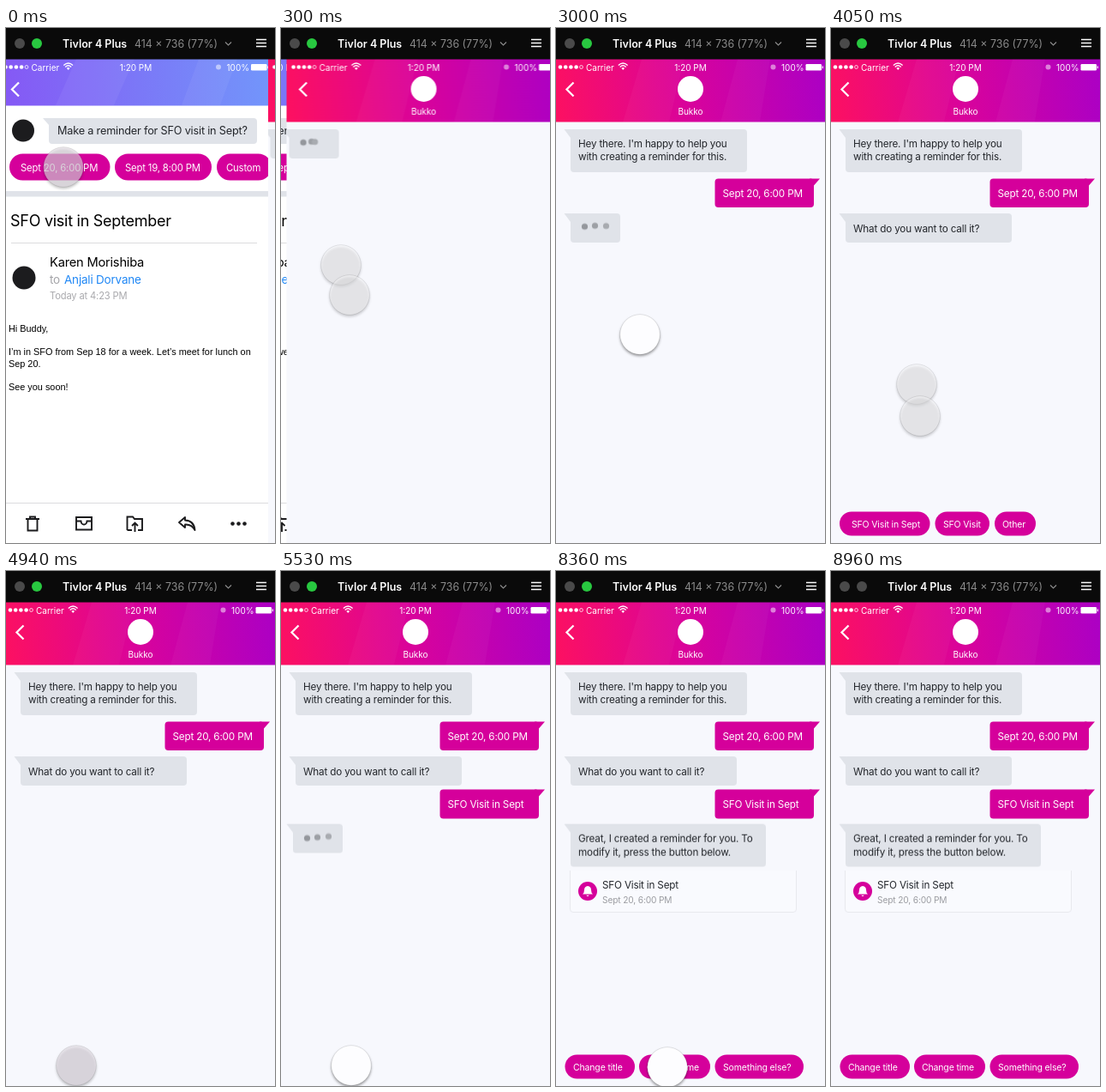
Animation of 314x600 px, one loop 9200 ms. Source, as an HTML page:

```html
<!DOCTYPE html>
<html lang="en">
<head>
<meta charset="utf-8">
<title>Reminder chat</title>
<style>
html, body { margin: 0; width: 100%; height: 100%; overflow: hidden; background: #fff; }
svg { display: block; width: 314px; height: 600px; }
text { font-family: Inter, Roboto, sans-serif; letter-spacing: -.015em; font-size: 11.7px; fill: #23262b; }
text.w { fill: #fff; }
text.s { font-size: 10px; letter-spacing: 0; }
text.pill { font-size: 10.5px; }
text.chip { font-size: 11.3px; }
text.mid { text-anchor: middle; }
text.mail { font: 10.88px "Liberation Sans", Arial, sans-serif; letter-spacing: 0; fill: #000; }
.line { fill: none; stroke: #1b1b1d; stroke-width: 1.9; }
.back { fill: none; stroke: #fff; stroke-width: 2.3; }
.pink { fill: #d5009b; }
.grey { fill: #e0e3e9; }

/* Page push: the old page moves at half speed */
.mailbox { animation: push-old 450ms linear both; }
.chat { animation: push-new 450ms linear both; }
@keyframes push-new {
  0% { transform: translateX(308.5px); } 33.333% { transform: translateX(80px); }
  66.667% { transform: translateX(9.5px); } 100% { transform: none; }
}
@keyframes push-old {
  0% { transform: none; } 33.333% { transform: translateX(-114px); }
  66.667% { transform: translateX(-149.5px); } 100% { transform: translateX(-154px); }
}

/* Replies: slide in with typing dots, then grow around the text */
@keyframes slide { from { transform: translateX(var(--from)); } to { transform: none; } }
@keyframes fade { from { opacity: 0; } to { opacity: 1; } }
@keyframes vanish { from { opacity: 1; } to { opacity: 0; } }
@keyframes grow {
  0% { width: 58px; height: 34px; }
  33.333% { width: calc(3.5px + var(--w) * .94); height: var(--h); }
  66.667% { width: calc(.6px + var(--w) * .99); height: var(--h); }
  100% { width: var(--w); height: var(--h); }
}
@keyframes bob { from { transform: none; } to { transform: translateY(-3px); } }
@keyframes gather { from { cx: var(--cx); } }
.reply { animation: slide var(--in) var(--t) ease-out both, fade 1ms calc(var(--t) - 1ms) both; }
.reply rect { animation: grow 450ms var(--open) linear both; }
.reply .words { animation: fade 130ms var(--open) linear both; }
.reply .dots { animation: vanish 130ms var(--open) linear both; }
.dots circle { fill: #94979c; animation: bob 450ms -845ms linear infinite alternate; }
.dots circle:nth-child(2) { fill: #9da0a5; animation-delay: -95ms; }
.dots circle:nth-child(3) { fill: #a8abb0; animation-delay: -245ms; }
.r1 { --in: 300ms; --t: 300ms; --open: 1050ms; --from: -17px; --w: 206px; --h: 50px; animation-name: slide, none; }
.r1 .dots circle:nth-child(2) { --cx: 26px; animation: bob 450ms -95ms linear infinite alternate, gather 150ms 300ms both; }
.r1 .dots circle:nth-child(3) { --cx: 30px; animation: bob 450ms -245ms linear infinite alternate, gather 150ms 300ms both; }
.r2 { --in: 150ms; --t: 2400ms; --open: 3150ms; --from: -1px; --w: 194px; --h: 34px; }
.r3 { --in: 150ms; --t: 5530ms; --open: 6130ms; --from: -3px; --w: 228px; --h: 50px; }

/* Answers from the right */
.sent { animation: send 450ms var(--t) linear both; }
@keyframes send {
  0% { transform: translateX(16px); opacity: 0; } 33.333% { transform: translateX(7px); opacity: .6; }
  66.667% { transform: translateX(1.5px); opacity: .93; } 100% { transform: none; opacity: 1; }
}

.choices { animation: fade 300ms 3300ms linear both, vanish 150ms 4780ms linear forwards; }
.edits { --from: -8px; animation: fade 440ms 6420ms linear both, slide 440ms 6420ms linear both; }
.card { animation: card 440ms 6420ms linear both; }
@keyframes card {
  0% { transform: translateX(-16px); opacity: 0; } 34% { transform: translateX(-12px); opacity: .6; }
  68% { transform: translateX(-3px); opacity: .9; } 100% { transform: none; opacity: 1; }
}

/* Touch pointer */
.touch { animation: move-a 600ms linear both, move-b 600ms 3900ms linear forwards, leave 600ms 8210ms linear forwards; }
.touch, .ghost { filter: drop-shadow(0 2px 1.5px rgba(0, 0, 0, .38)); }
.touch circle { fill: #fdfdff; stroke: rgba(0, 0, 0, .14); stroke-width: .7;
  animation: lift 600ms linear both, pass 600ms 3900ms linear forwards, press 450ms 4630ms linear forwards; }
.ghost { opacity: 0; fill: rgba(253, 253, 255, .5); stroke: rgba(0, 0, 0, .14); stroke-width: .7;
  animation: blink 150ms var(--t); }
@keyframes blink { from, to { opacity: 1; } }
@keyframes move-a {
  0% { transform: translate(67px, 162px); } 25% { transform: translate(68px, 190px); }
  50% { transform: translate(80px, 311px); } 75% { transform: translate(95px, 350px); }
  100% { transform: translate(98px, 357px); }
}
@keyframes move-b {
  0% { transform: translate(98px, 357px); } 25% { transform: translate(104px, 452px); }
  50% { transform: translate(93px, 545px); } 75% { transform: translate(83px, 573px); }
  100% { transform: translate(82px, 576px); }
}
@keyframes leave {
  0% { transform: translate(82px, 576px); } 25% { transform: translate(130px, 578px); }
  50% { transform: translate(210px, 580px); } 75% { transform: translate(285px, 584px); }
  100% { transform: translate(285px, 640px); }
}
@keyframes lift {
  0%, 25% { fill: rgba(228, 222, 230, .62); } 50% { fill: rgba(253, 253, 255, .5); } 100% { fill: #fdfdff; }
}
@keyframes pass { 0%, 100% { fill: #fdfdff; } 25%, 50% { fill: rgba(253, 253, 255, .5); } }
@keyframes press { 0%, 100% { fill: #fdfdff; } 33%, 66% { fill: rgba(228, 222, 230, .62); } }

.live { fill: #28c840; animation: off 1ms 8809ms forwards; }
@keyframes off { to { fill: #4a4a4a; } }
</style>
</head>
<body>
<svg viewBox="0 0 314 600">
  <defs>
    <linearGradient id="violet" gradientUnits="userSpaceOnUse" x1="0" y1="70" x2="310" y2="50">
      <stop offset="0" stop-color="#8559f5"/><stop offset=".5" stop-color="#7b78f7"/><stop offset="1" stop-color="#7296fb"/>
    </linearGradient>
    <linearGradient id="magenta" gradientUnits="userSpaceOnUse" x1="0" y1="90" x2="314" y2="55">
      <stop offset="0" stop-color="#fc1062"/><stop offset=".48" stop-color="#d9039b"/><stop offset="1" stop-color="#ac00c4"/>
    </linearGradient>
    <clipPath id="page"><rect x="-2.5" y="0" width="319" height="600"/></clipPath>
    <g id="status">
      <g fill="#fff">
        <circle cx="5" cy="45.5" r="2.3"/><circle cx="11.2" cy="45.5" r="2.3"/>
        <circle cx="17.4" cy="45.5" r="2.3"/><circle cx="23.6" cy="45.5" r="2.3"/>
        <rect x="291.500" y="42" width="18.500" height="7.500" rx="1.200"/><rect x="310.700" y="44.300" width="1.200" height="3" rx=".5"/>
        <path d="M76.300 46.800Q78.200 45 80.100 46.800L78.200 49z"/>
      </g>
      <circle cx="29.500" cy="45.500" r="1.900" fill="none" stroke="#fff" stroke-width=".8"/>
      <path d="M72.800 43.400Q78.200 38.500 83.600 43.400M74.700 45.400Q78.200 42.200 81.700 45.400" fill="none" stroke="#fff" stroke-width="1.300"/>
      <circle cx="253.500" cy="45.500" r="3" fill="#fff" opacity=".5"/>
      <text class="w s" x="35" y="49.500">Carrier</text>
      <text class="w s mid" x="157" y="49.500">1:20 PM</text>
      <text class="w s" x="263" y="49.500">100%</text>
      <path class="back" d="M20.500 63.500L12.500 71.500L20.500 79.500"/>
    </g>
    <g id="dots">
      <circle cx="16.500" cy="17" r="3.600"/><circle cx="28.500" cy="17" r="3.600"/><circle cx="41.500" cy="17" r="3.600"/>
    </g>
  </defs>

  <g class="mailbox">
    <rect x="-10" width="340" height="600" fill="#fff"/>
    <rect x="-10" y="36" width="340" height="54.500" fill="url(#violet)"/>
    <path d="M58 90L82 36H150L126 90zM205 90L225 36H270L250 90z" fill="#fff" opacity=".05"/>
    <use href="#status" x="-5.500"/>
    <circle cx="20" cy="119.500" r="13" fill="#1c1c1e"/>
    <path class="grey" d="M43 105H289a4 4 0 0 1 4 4V131a4 4 0 0 1-4 4H54a4 4 0 0 1-4-4V113z"/>
    <text x="60" y="124.300" style="font-size:12.7px">Make a reminder for SFO visit in Sept?</text>
    <g class="pink">
      <rect x="4" y="146.500" width="117.500" height="31" rx="15.500"/>
      <rect x="127" y="146.500" width="113" height="31" rx="15.500"/>
      <rect x="246" y="146.500" width="64" height="31" rx="15.500"/>
    </g>
    <text class="w chip" x="17" y="166.500">Sept 20, 6:00 PM</text>
    <text class="w chip" x="139" y="166.500">Sept 19, 8:00 PM</text>
    <text class="w chip" x="257" y="166.500">Custom</text>
    <rect class="grey" x="-10" y="190" width="340" height="6.500"/>
    <text x="5" y="231" style="font-size:18px;fill:#000">SFO visit in September</text>
    <path d="M6 250.500H293M-10 553.500H330" stroke="#dcdcde"/>
    <circle cx="21" cy="291" r="13.500" fill="#1c1c1e"/>
    <text x="51" y="278" style="font-size:14.7px;fill:#000">Karen Morishiba</text>
    <text x="51" y="298" style="font-size:13.5px;fill:#a4a4a8">to</text>
    <text x="68" y="298" style="font-size:13.5px;fill:#1f87f5">Anjali Dorvane</text>
    <text x="51" y="316" style="font-size:11.2px;fill:#a9a9ad">Today at 4:23 PM</text>
    <text class="mail" x="3" y="354">Hi Buddy,</text>
    <text class="mail" x="3" y="381.300">I’m in SFO from Sep 18 for a week. Let’s meet for lunch on</text>
    <text class="mail" x="3" y="395">Sep 20.</text>
    <text class="mail" x="3" y="422">See you soon!</text>
    <g class="line">
      <path d="M23 572H39M28 571.500V569.500H34V571.500M25.500 572V585.500H36.500V572"/>
      <path d="M82 570H100V584.500H82zM82 574.500H87.500Q88 578.500 91 578.500T94.500 574.500H100"/>
      <path d="M141.500 585V569.500H148L150 572H159V585H154M141.500 585H147M150.500 587V577M147 580L150.500 576.500L154 580"/>
      <path d="M209 570L202 576L209 582V578.500Q217 578 220.500 585Q219.500 574 209 573.500z" stroke-linejoin="round"/>
    </g>
    <g fill="#1b1b1d"><circle cx="264.500" cy="577.500" r="2.300"/><circle cx="271.500" cy="577.500" r="2.300"/><circle cx="278.500" cy="577.500" r="2.300"/></g>
  </g>

  <g class="chat"><g clip-path="url(#page)">
    <rect x="-3" width="320" height="600" fill="#f7f8fd"/>
    <rect x="-3" y="36" width="320" height="73.500" fill="url(#magenta)"/>
    <path d="M78 109.500L100 36H150L132 109.500zM192 109.500L212 36H250L238 109.500z" fill="#fff" opacity=".03"/>
    <use href="#status"/>
    <circle cx="157" cy="71" r="15" fill="#fff"/>
    <text class="w s mid" x="157" y="101">Bukko</text>

    <g transform="translate(17 118)"><g class="reply r1">
      <path class="grey" d="M-7.500 0H5V10H0z"/><rect class="grey" width="206" height="50" rx="4"/>
      <g class="dots"><circle cx="16.500" cy="17" r="3.600"/><circle cx="28.500" cy="17" r="3.600"/><circle cx="41.500" cy="17" r="3.600"/></g>
      <g class="words"><text x="9" y="20.500">Hey there. I'm happy to help you</text><text x="9" y="36">with creating a reminder for this.</text></g>
    </g></g>
    <g class="sent" style="--t:1500ms">
      <path class="pink" d="M296 175.500H308L301 183.500z"/><rect class="pink" x="185.500" y="175.500" width="115.500" height="33.500" rx="4"/>
      <text class="w" x="194.500" y="196.500">Sept 20, 6:00 PM</text>
    </g>
    <g transform="translate(17 216)"><g class="reply r2">
      <path class="grey" d="M-7.500 0H5V10H0z"/><rect class="grey" width="194" height="34" rx="4"/>
      <g class="dots"><circle cx="16.500" cy="17" r="3.600"/><circle cx="28.500" cy="17" r="3.600"/><circle cx="41.500" cy="17" r="3.600"/></g>
      <g class="words"><text x="9" y="21.500">What do you want to call it?</text></g>
    </g></g>
    <g class="sent" style="--t:4930ms">
      <path class="pink" d="M296 254.500H308L301 262.500z"/><rect class="pink" x="185.500" y="254.500" width="115.500" height="34" rx="4"/>
      <text class="w" x="194.500" y="276">SFO Visit in Sept</text>
    </g>
    <g transform="translate(17 294.700)"><g class="reply r3">
      <path class="grey" d="M-7.500 0H5V10H0z"/><rect class="grey" width="228" height="50" rx="4"/>
      <g class="dots"><circle cx="16.500" cy="17" r="3.600"/><circle cx="28.500" cy="17" r="3.600"/><circle cx="41.500" cy="17" r="3.600"/></g>
      <g class="words"><text x="9" y="21">Great, I created a reminder for you. To</text><text x="9" y="36.500">modify it, press the button below.</text></g>
    </g></g>
    <g class="card">
      <path d="M16.500 349V394a3.500 3.500 0 0 0 3.500 3.500H277a3.500 3.500 0 0 0 3.500-3.500V349" fill="#f9fafe" stroke="#e8e9ee"/>
      <circle class="pink" cx="37" cy="373" r="11"/>
      <path d="M31 376.500Q33 375 33 371.500Q33 367.500 37 367Q41 367.500 41 371.500Q41 375 43 376.500zM35.300 377.700H38.700Q37 380.300 35.300 377.700z" fill="#fff"/>
      <text x="54" y="369.500">SFO Visit in Sept</text>
      <text x="54" y="386.500" style="font-size:10.2px;fill:#9b9ca1">Sept 20, 6:00 PM</text>
    </g>

    <g class="choices">
      <g class="pink">
        <rect x="10" y="563.500" width="105.500" height="28" rx="14"/><rect x="121.500" y="563.500" width="63.500" height="28" rx="14"/>
        <rect x="191" y="563.500" width="48" height="28" rx="14"/>
      </g>
      <text class="w pill" x="24" y="582">SFO Visit in Sept</text>
      <text class="w pill" x="131" y="582">SFO Visit</text>
      <text class="w pill" x="200" y="582">Other</text>
    </g>
    <g class="edits">
      <g class="pink">
        <rect x="10.500" y="563.500" width="81.500" height="28" rx="14"/><rect x="97" y="563.500" width="83" height="28" rx="14"/>
        <rect x="185.500" y="563.500" width="103.500" height="28" rx="14"/>
      </g>
      <text class="w pill" x="20" y="582">Change title</text>
      <text class="w pill" x="106" y="582">Change time</text>
      <text class="w pill" x="195" y="582">Something else?</text>
    </g>
  </g></g>

  <circle class="ghost" style="--t:300ms" cx="70" cy="276" r="23.300"/>
  <circle class="ghost" style="--t:4050ms" cx="100" cy="415" r="23.300"/>
  <g class="touch"><circle r="23.300"/></g>

  <rect width="314" height="36.500" fill="#0a0a0a"/>
  <circle cx="16" cy="18" r="6" fill="#4a4a4a"/>
  <circle class="live" cx="36" cy="18" r="6"/>
  <text class="w" x="66" y="22.500" style="font-size:12.5px;font-weight:600;letter-spacing:0">Tivlor 4 Plus</text>
  <text x="150" y="22.500" style="font-size:12.4px;letter-spacing:0;fill:#8b8b8b">414 × 736 (77%)</text>
  <path d="M256 16.500L259.500 20L263 16.500" fill="none" stroke="#8b8b8b" stroke-width="1.200"/>
  <path d="M292 13.500H304M292 17.500H304M292 21.500H304" stroke="#fff" stroke-width="1.300"/>
</svg>
<script>
// The motion ticks in 150 ms steps; each run of steps begins at one of these times.
const LOOP = 9200, STEP = 150, RUNS = [0, 4780, 6270, 6860];
const motions = document.getAnimations();
motions.forEach(m => m.pause());
const start = performance.now();

function tick() {
  const t = (performance.now() - start) % LOOP;
  const run = RUNS.filter(r => r <= t).pop();
  const now = run + Math.floor((t - run) / STEP) * STEP;
  motions.forEach(m => { m.currentTime = now; });
  requestAnimationFrame(tick);
}
tick();
</script>
</body>
</html>
```
